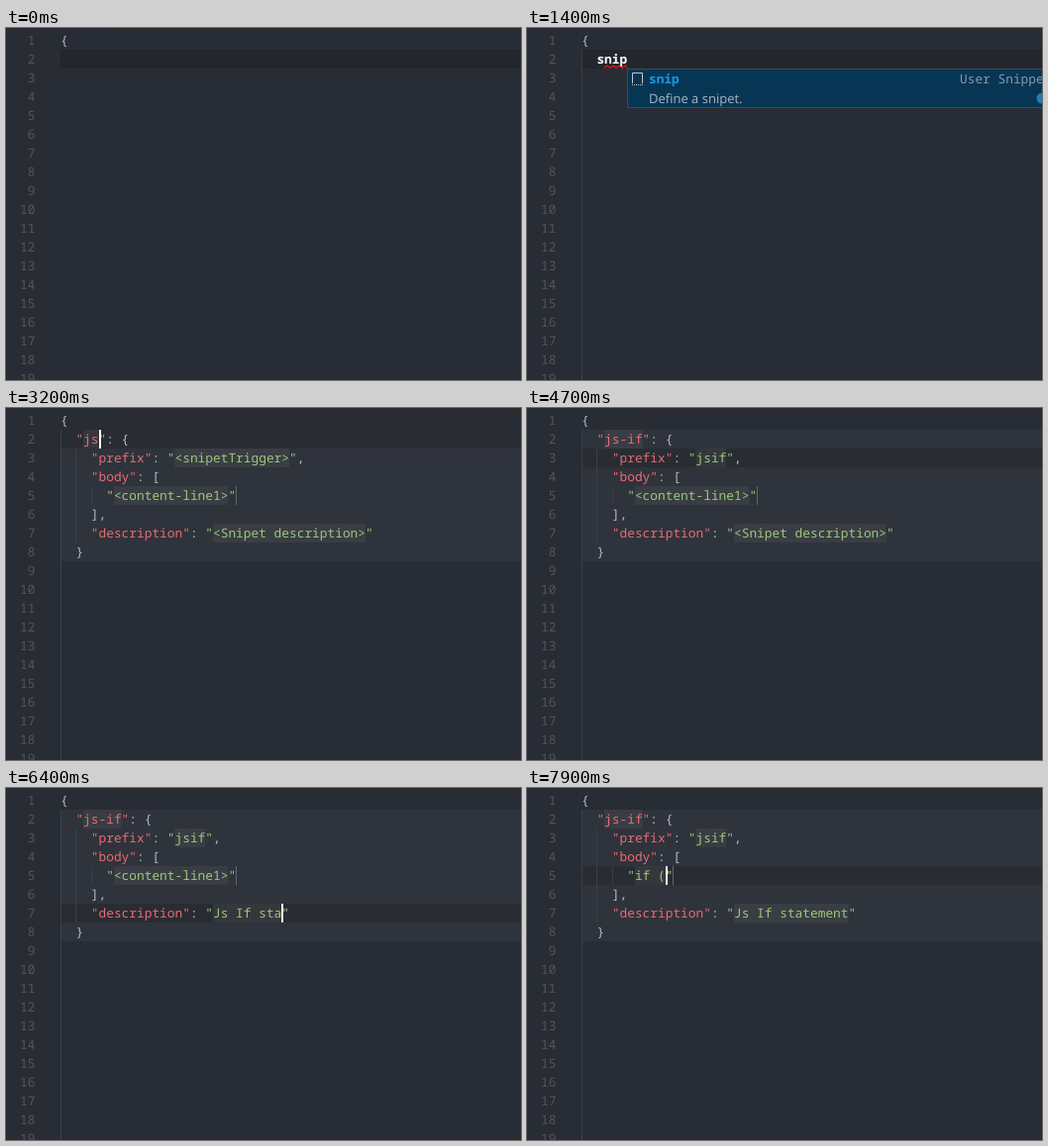
Recreate the animation shown at these times as an HTML page with a canvas. Size 520x356 px, loop 8 s.

```html
<!DOCTYPE html>
<html lang="en">
<head>
<meta charset="utf-8">
<title>Snippet editor</title>
<style>
  html, body { margin: 0; width: 100%; height: 100%; overflow: hidden; background: #282c34; }
  canvas { display: block; }
</style>
</head>
<body>
<canvas width="520" height="356"></canvas>
<script>
const LOOP = 8000, W = 520, H = 356;
const LEFT = 55, TOP = 3, ROW = 19, CHAR = 7.7;
const MONO = '12.83px "Noto Sans Mono", monospace';
const KEY = '#e96b73', STRING = '#9aca78', PLAIN = '#b4bac6';
const ctx = document.querySelector('canvas').getContext('2d');

const colX = col => LEFT + col * CHAR;
const rowY = row => TOP + (row - 1) * ROW;

const placeholders = {
  word: '',
  name: '<snipetName>',
  trigger: '<snipetTrigger>',
  body: '<content-line1>',
  desc: '<Snipet description>'
};

// [time, field, typed text]; without text the whole placeholder is selected
const steps = [
  [-500, 'word', ''],
  [200, 'word', ''],
  [400, 'word', 's'],
  [600, 'word', 'sn'],
  [700, 'word', 'sni'],
  [1000, 'word', 'snip'],
  [2800, 'name'],
  [3000, 'name', 'j'],
  [3200, 'name', 'js'],
  [3400, 'name', 'js-'],
  [3500, 'name', 'js-i'],
  [3700, 'name', 'js-if'],
  [3900, 'trigger'],
  [4000, 'trigger', 'j'],
  [4200, 'trigger', 'js'],
  [4300, 'trigger', 'jsi'],
  [4400, 'trigger', 'jsif'],
  [5300, 'desc'],
  [5500, 'desc', 'J'],
  [5600, 'desc', 'Js'],
  [5800, 'desc', 'Js '],
  [5900, 'desc', 'Js I'],
  [6000, 'desc', 'Js If'],
  [6100, 'desc', 'Js If '],
  [6200, 'desc', 'Js If s'],
  [6300, 'desc', 'Js If st'],
  [6400, 'desc', 'Js If sta'],
  [6600, 'desc', 'Js If state'],
  [6700, 'desc', 'Js If statem'],
  [6800, 'desc', 'Js If statemen'],
  [6900, 'desc', 'Js If statement'],
  [7200, 'body'],
  [7500, 'body', 'i'],
  [7600, 'body', 'if'],
  [7800, 'body', 'if '],
  [7900, 'body', 'if (']
];

// Snippet rows: [row, indent, ...[colour, text or {field}]]
const snippet = [
  [2, 2, [KEY, '"'], [KEY, { field: 'name' }], [KEY, '"'], [PLAIN, ': {']],
  [3, 4, [KEY, '"prefix"'], [PLAIN, ': '], [STRING, '"'], [STRING, { field: 'trigger' }], [STRING, '"'], [PLAIN, ',']],
  [4, 4, [KEY, '"body"'], [PLAIN, ': [']],
  [5, 6, [STRING, '"'], [STRING, { field: 'body' }], [STRING, '"']],
  [6, 4, [PLAIN, '],']],
  [7, 4, [KEY, '"description"'], [PLAIN, ': '], [STRING, '"'], [STRING, { field: 'desc' }], [STRING, '"']],
  [8, 2, [PLAIN, '}']]
];
const fieldRow = { word: 2, name: 2, trigger: 3, body: 5, desc: 7 };

function stateAt(time) {
  const state = { ...placeholders };
  for (const [at, field, text] of steps) {
    if (at > time) break;
    if (text !== undefined) state[field] = text;
    Object.assign(state, { field, selected: text === undefined, since: at });
  }
  return state;
}

function rect(color, x, y, w, h) {
  ctx.fillStyle = color;
  ctx.fillRect(x, y, w, h);
}

// Monospaced text on the character grid
function grid(text, x, y, color, weight = '') {
  ctx.font = `${weight} ${MONO}`;
  ctx.fillStyle = color;
  [...text].forEach((ch, i) => ctx.fillText(ch, x + i * CHAR, y));
}

function drawFrame() {
  rect('#282c34', 0, 0, W, H);
  rect('#2d2d2d', 110, 0, W - 110, 3);
  for (let x = 108; x < W; x += 120) rect('#25272a', x, 0, 1, 3);
  for (let n = 1; n <= 19; n++) {
    const label = String(n);
    grid(label, 29.4 - label.length * CHAR, rowY(n) + 14, '#54565a');
  }
  grid('{', LEFT, rowY(1) + 14, PLAIN);
}

function drawCaret(col, row, elapsed) {
  const phase = elapsed % 1000;
  const p = Math.min(phase, 1000 - phase);
  ctx.globalAlpha = Math.max(0, Math.min(1, (300 - p) / 200));
  rect('#ffffff', Math.round(colX(col)), rowY(row), 2, ROW);
  ctx.globalAlpha = 1;
}

function drawSquiggle(x1, x2, y) {
  ctx.beginPath();
  ctx.moveTo(x1, y + 1.5);
  for (let x = x1, up = false; x < x2; x += 3, up = !up) {
    ctx.lineTo(Math.min(x + 3, x2), up ? y + 1.5 : y - 1);
  }
  ctx.strokeStyle = '#f01010';
  ctx.lineWidth = 1.2;
  ctx.stroke();
}

function drawPopup() {
  rect('#45494c', 101, 41, W, 40);
  rect('#073655', 102, 42, W, 38);
  ctx.strokeStyle = '#c5c5c5';
  ctx.lineWidth = 1;
  ctx.beginPath();
  ctx.moveTo(106.5, 56);
  ctx.lineTo(106.5, 45.5);
  ctx.lineTo(116.5, 45.5);
  ctx.lineTo(116.5, 56);
  ctx.stroke();
  for (let x = 106; x < 118; x += 2) rect('#c5c5c5', x, 57, 1, 1);
  grid('snip', 123, 56, '#1c97e0', 'bold');
  grid('User Snippet', 437, 56, '#8499a8');
  ctx.font = '13px "Open Sans", sans-serif';
  ctx.fillStyle = '#a9b7c1';
  ctx.fillText('Define a snipet.', 123, 76);
  ctx.fillStyle = '#1b80b2';
  ctx.beginPath();
  ctx.arc(520, 71, 5.5, 0, Math.PI * 2);
  ctx.fill();
}

function drawSnippet(state) {
  let caretCol = 0;
  for (const [row, indent, ...parts] of snippet) {
    let col = indent;
    const y = rowY(row);
    for (const [color, part] of parts) {
      const text = part.field ? state[part.field] : part;
      if (part.field) {
        const active = part.field === state.field;
        const fill = active && state.selected ? '#465064' : 'rgba(124,124,124,.15)';
        rect(fill, colX(col), y, text.length * CHAR, ROW);
        if (active) caretCol = col + text.length;
      }
      grid(text, colX(col), y + 14, color);
      col += text.length;
    }
    if (row === 5) rect('#62676d', Math.floor(colX(col)), y, 1, ROW);
  }
  return caretCol;
}

function draw(time) {
  const state = stateAt(time);
  const row = fieldRow[state.field];
  const expanded = state.field !== 'word';
  const guide = '#3b3f47';

  drawFrame();
  if (expanded) rect('#2f333b', LEFT, rowY(2), W, ROW * 7);
  rect(expanded ? '#292c33' : '#23262d', LEFT, rowY(row), W, ROW);
  if (time >= 200) rect(guide, LEFT, rowY(2), 1, H);

  let caretCol;
  if (expanded) {
    rect(guide, 70, rowY(3), 1, ROW * 5);
    rect(guide, 86, rowY(5), 1, ROW);
    caretCol = drawSnippet(state);
  } else {
    caretCol = 2 + state.word.length;
    grid(state.word, colX(2), rowY(2) + 14, '#ffffff', 'bold');
    if (state.word.length > 1) drawSquiggle(78, colX(caretCol), 39);
    if (time >= 1000) drawPopup();
  }
  drawCaret(caretCol, row, time - state.since);
}

ctx.textRendering = 'geometricPrecision';
const start = performance.now();
function tick() {
  draw((performance.now() - start) % LOOP);
  requestAnimationFrame(tick);
}
tick();
</script>
</body>
</html>
```
